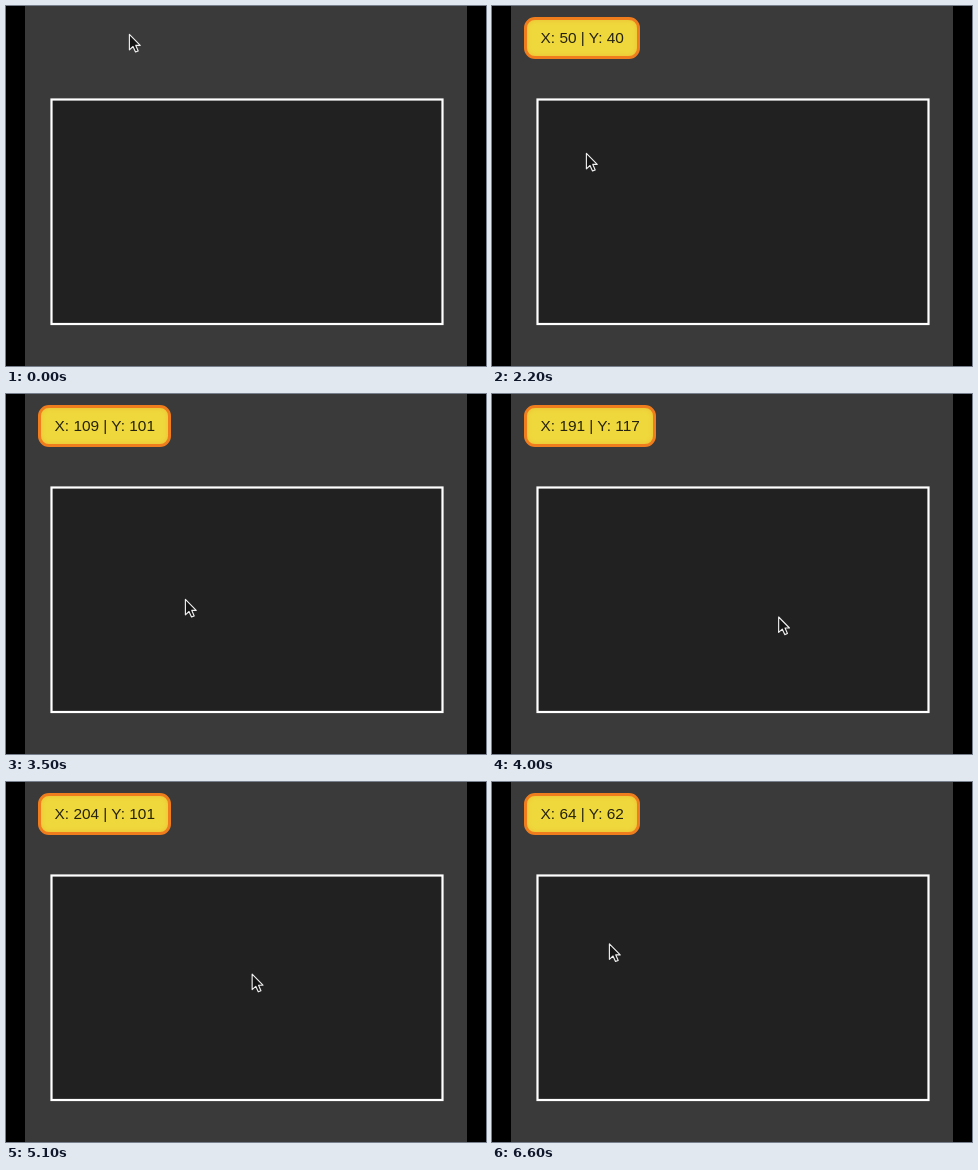
These frames come from a looping animation (480 px wide and 360 px high, 6700 ms). An HTML page:

```html
<!DOCTYPE html>
<html lang="en">
<head>
<meta charset="utf-8">
<title>Pointer coordinates</title>
<style>
  html, body { margin: 0; width: 100%; height: 100%; overflow: hidden; background: #000; }
  #stage { position: relative; width: 480px; height: 360px; overflow: hidden; }
  svg { position: absolute; left: 0; top: 0; }
  #label {
    position: absolute; left: 32.4px; top: 11.2px; height: 42px; box-sizing: border-box;
    padding: 0 13.2px; border: 3.4px solid #f07d1d; border-radius: 11px;
    background: #efd83c; box-shadow: inset 0 0 4px rgba(235, 150, 40, .4);
    color: #25220f; white-space: pre;
    font: 15.4px/35.2px "Liberation Sans", Arial, sans-serif;
  }
</style>
</head>
<body>
<div id="stage">
  <svg width="480" height="360">
    <rect x="19" width="442" height="360" fill="#3a3a3a"/>
    <rect x="45.5" y="93.5" width="391" height="224.5" fill="#212121" stroke="#fff" stroke-width="2.2"/>
  </svg>
  <div id="label"></div>
  <svg width="480" height="360">
    <path id="cursor" d="M.4 .4V15.8L4 12.5L6.5 18L9.2 16.9L6.8 11.4H11.2Z"
      fill="#141414" stroke="#eee" stroke-width="1.15" stroke-linejoin="round"/>
  </svg>
</div>
<script>
const STEP = 100, STEPS = 67;

// Pointer stops; it rests at each one unless a speed in px per step is given.
const stops = [
  { t: 4, x: 123, y: 28 },
  { t: 12, x: 159, y: 122.6 },
  { t: 22, x: 94, y: 147, vx: -7.3, vy: 9.2 },
  { t: 35, x: 179, y: 205, vx: 11, vy: 2.6 },
  { t: 45, x: 366, y: 233.7 },
  { t: 57, x: 125.5, y: 149.9 },
  { t: 66, x: 117, y: 161.5 }
];
const label = document.getElementById("label");
const cursor = document.getElementById("cursor");

// Cubic Hermite curve through the stops
function position(t, axis) {
  const next = stops.findIndex(s => s.t > t);
  if (next === 0) return stops[0][axis];
  if (next < 0) return stops[stops.length - 1][axis];
  const a = stops[next - 1], b = stops[next];
  const speed = s => s["v" + axis] || 0;
  const span = b.t - a.t, u = (t - a.t) / span, w = 1 - u;
  return w * w * (1 + 2 * u) * a[axis] + u * u * (3 - 2 * u) * b[axis]
    + span * u * w * (w * speed(a) - u * speed(b));
}

// The readout trails the pointer by one step of its current speed.
function reading(t, axis, origin, scale) {
  const d = 0.01;
  const speed = (position(t + d, axis) - position(t - d, axis)) / (2 * d);
  return Math.round((position(t, axis) - speed - origin) * scale);
}

function draw(time) {
  const t = Math.floor(time / STEP) % STEPS;
  cursor.setAttribute("transform", `translate(${position(t, "x")} ${position(t, "y")})`);

  const x = reading(t, "x", 44.75, 0.884);
  const y = reading(t, "y", 95.5, 0.945);
  label.style.display = y >= 0 ? "block" : "none";
  label.textContent = `X: ${x} | Y: ${y}`;
}

const start = performance.now();
function tick() {
  draw(performance.now() - start);
  requestAnimationFrame(tick);
}
tick();
</script>
</body>
</html>
```
